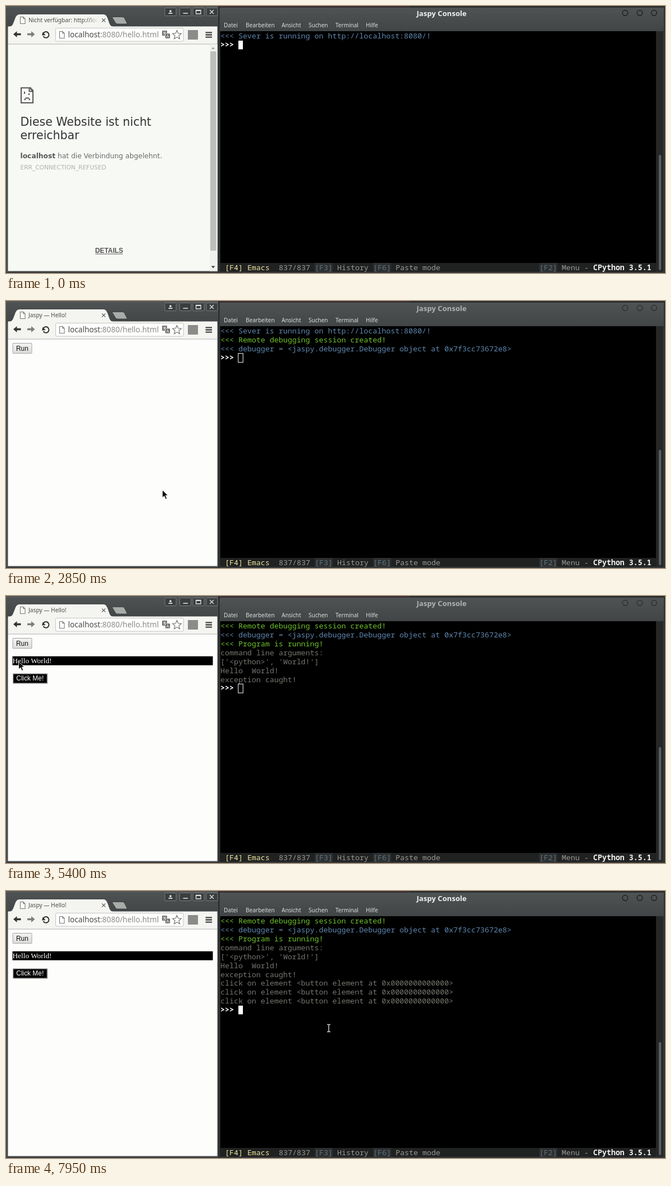
Animation, 1174 px wide and 477 px high, one loop 8 s. Source, as an HTML page:

```html
<!DOCTYPE html>
<html lang="de">
<head>
<meta charset="utf-8">
<title>Jaspy Console</title>
<style>
html, body { margin: 0; width: 100%; height: 100%; overflow: hidden; background: #2b2d2d; }
svg { display: block; width: 1174px; height: 477px; }
text { white-space: pre; }
.ui { font-family: "Noto Sans", sans-serif; }
.web { font-family: "DejaVu Sans", sans-serif; }
.btn { font-family: "Liberation Sans", Arial, sans-serif; font-size: 11.9px; }
.mono { font-family: "Noto Sans Mono", monospace; font-size: 13.3px; }
.b { font-weight: bold; }
</style>
</head>
<body>
<svg viewBox="0 0 1174 477" xmlns="http://www.w3.org/2000/svg">
  <defs>
    <linearGradient id="bar" x1="0" y1="0" x2="0" y2="1">
      <stop offset="0" stop-color="#505354"/><stop offset="1" stop-color="#424546"/>
    </linearGradient>
    <linearGradient id="face" x1="0" y1="0" x2="0" y2="1">
      <stop offset="0" stop-color="#f3f3f2"/><stop offset="1" stop-color="#dcdddb"/>
    </linearGradient>
    <linearGradient id="fade" gradientUnits="userSpaceOnUse" x1="146" x2="164" y1="0" y2="0">
      <stop offset="0" stop-color="#4a4a4a"/><stop offset="1" stop-color="#4a4a4a" stop-opacity="0"/>
    </linearGradient>
    <path id="doc" d="M.5 .5H5.8L9 3.7V12.5H.5ZM5.8 .5V3.7H9" fill="#fff" stroke="#777" stroke-width="1.1"/>
  </defs>

  <rect width="1174" height="477" fill="#2b2d2d"/>
  <path d="M380 .8H720" stroke="#4a3335" stroke-width="1.6"/>

  <!-- browser window -->
  <rect y="1" width="378" height="475" fill="#4a4d4d"/>
  <rect x="1" y="1" width="376" height="38" fill="url(#bar)"/>
  <path d="M0 1H378" stroke="#6a6d6d"/>
  <g id="winBtns" stroke="#777a7a" fill="#3b3e3e"></g>
  <g fill="none" stroke="#e2e3e2" stroke-width="1.3">
    <path d="M315.5 13H324M338.5 7.5H347V14H338.5ZM338.5 8.3H347M363 7L370 14M370 7L363 14"/>
    <path d="M289.5 13H296.5" stroke-width="1.8"/><circle cx="293" cy="9.2" r="1.2" fill="#e2e3e2"/>
  </g>
  <path d="M189 20Q188 19.5 191 19.5H207Q210 19.5 211 21.5L215.5 30.5Q216 32 214 32H199Q196 32 195 30Z" fill="#a9aba8" stroke="#333636" stroke-width=".8"/>
  <path d="M5 37C12 36.500 12 33 16 23Q18.500 15 24 15H174Q178.500 15 181 22C185 33 185 36.500 192 37Z" fill="#f4f5f1"/>
  <rect x="3.500" y="36.500" width="373" height="32" fill="#f4f5f1"/>
  <path d="M3.500 68H376.500" stroke="#b6b7b4"/>
  <use id="tabDoc" href="#doc" x="25" y="19"/>
  <path id="spin" d="M28 20.800A6 6 0 0 1 32 20.500" fill="none" stroke="#5b8bd8" stroke-width="1.6"/>
  <text id="tab" class="ui" x="40" y="29.300" font-size="10.2" fill="#4a4a4a"></text>
  <path d="M171 22.500L177 28.500M177 22.500L171 28.500" stroke="#6a6a6a" stroke-width="1.3"/>

  <path d="M13 50.500L19.500 45V48.700H26.500V52.300H19.500V56Z" fill="#333"/>
  <path d="M51.500 50.500L45 45V48.700H38V52.300H45V56Z" fill="#7d7e7c"/>
  <g id="reload">
    <path d="M66.500 54A5.300 5.300 0 1 0 66.300 49.200" fill="none" stroke="#333" stroke-width="2"/>
    <path d="M64 52.500L70.500 52L65.500 46.500Z" fill="#333"/>
  </g>
  <g id="stop" fill="none" stroke="#c5352c" stroke-width="2.600">
    <circle cx="71" cy="51" r="5.600"/><path d="M67 47.500L75 54.500"/>
  </g>
  <rect x="88.500" y="39.500" width="227.500" height="23.500" rx="2" fill="#fefefd" stroke="#c4c5c2"/>
  <use href="#doc" x="95" y="45"/>
  <text class="ui" x="110.500" y="56.300" font-size="13.600" fill="#8c8c8a"><tspan fill="#4b4b4b">localhost</tspan>:8080/hello.html</text>
  <g id="translate">
    <rect x="278" y="44" width="9" height="9" rx="1" fill="#777"/>
    <rect x="283.500" y="49" width="9" height="9" rx="1" fill="#666" stroke="#fefefd" stroke-width=".7"/>
    <path d="M280 47H285M282.500 46V47C282.500 49 281 50.500 280 51M281 48.500L285 51M285.500 56.500L288 51L290.500 56.500M286.500 54.800H289.500" fill="none" stroke="#eee" stroke-width=".9"/>
  </g>
  <path d="M304.500 43.500L306.700 48.800L312.300 49.300L308 53L309.400 58.600L304.500 55.600L299.600 58.600L301 53L296.700 49.300L302.300 48.800Z" fill="#fefefd" stroke="#777" stroke-width="1.200"/>
  <rect x="324" y="43" width="18" height="17" fill="#8b8b89"/>
  <path d="M355.500 47.300H367M355.500 51.500H367M355.500 55.700H367" stroke="#444" stroke-width="2.300"/>

  <g id="errPage">
    <rect x="3.500" y="68.500" width="373" height="405" fill="#f7f9f5"/>
    <rect x="363" y="68.500" width="13.500" height="405" fill="#f1f2ef"/>
    <rect x="364" y="81" width="10.500" height="356" fill="#bebfbc"/>
    <path d="M366 77L369 73.500L372 77Z" fill="#a2a3a0"/>
    <path d="M365.500 464.500H372.500L369 468.500Z" fill="#444"/>
    <path d="M41.500 146.200H27V173H48V152.500H41.500V146.200H44V148.500H46V150.500H48V152.500" fill="none" stroke="#565756" stroke-width="2"/>
    <path d="M32 153H34V157H32ZM40 156H42V159H40ZM34.500 163.500H41V165.500H34.500ZM32.500 165.500H35V168H32.500ZM40.500 165.500H43V168H40.500Z" fill="#565756"/>
    <g class="web">
      <g font-size="20.450" fill="#333"><text x="25.500" y="213.500">Diese Website ist nicht</text><text x="25.500" y="238.200">erreichbar</text></g>
      <text x="25.500" y="272" font-size="12.250" fill="#6a6b6a"><tspan class="b" fill="#565756">localhost</tspan> hat die Verbindung abgelehnt.</text>
      <text x="25.500" y="292.300" font-size="10.600" fill="#b0b2af">ERR_CONNECTION_REFUSED</text>
    </g>
    <text class="btn b" x="158.700" y="441.200" fill="#565756">DETAILS</text>
    <path d="M159 443H208" stroke="#565756"/>
  </g>

  <g id="helloPage">
    <rect x="3.500" y="68.500" width="373" height="405" fill="#fdfefc"/>
    <rect id="run" x="12" y="75.500" width="34" height="18" rx="1" stroke="#a5a6a4"/>
    <text class="btn" x="18" y="88.500" fill="#111">Run</text>
    <g id="hello">
      <rect x="11.500" y="107.700" width="357" height="16" fill="#000"/>
      <text x="11.500" y="120" font-family="'Liberation Serif', serif" font-size="13.300" fill="#fff">Hello World!</text>
    </g>
    <g id="click">
      <rect id="ring" x="11.500" y="137.500" width="62.500" height="19" fill="none" stroke="#8a8a8a"/>
      <rect id="face2" x="13" y="139" width="60" height="16.500"/>
      <path d="M73.200 138.500V155.700H12" fill="none" stroke="#747474" stroke-width="1.600"/>
      <path d="M12.500 156V138.700H73.500" fill="none" stroke="#bbb" stroke-width="1.400"/>
      <text id="clickText" class="btn" x="18.300" y="151">Click Me!</text>
    </g>
  </g>

  <!-- terminal window -->
  <rect x="378" y="1" width="2" height="475" fill="#2a2c2c"/>
  <rect x="380" y="2.500" width="792" height="474" fill="#3b3e3e"/>
  <rect x="381" y="3" width="791" height="42" fill="url(#bar)"/>
  <text id="title" class="ui b" x="776" y="18" font-size="13.100" text-anchor="middle" textLength="">Jaspy Console</text>
  <g id="dots" fill="none" stroke-width="1.400"></g>
  <g id="menu" class="ui" font-size="10" fill="#dcdddc"></g>
  <rect x="381.500" y="45" width="776.500" height="430" fill="#000"/>
  <rect x="1158" y="45" width="13" height="430" fill="#262828"/>
  <rect id="thumb" x="1163" width="4.200" rx="2" fill="#5c5f5f"/>
  <rect x="381.500" y="459" width="776.500" height="16" fill="#202121"/>
  <g id="status" class="mono"></g>
  <g id="lines" class="mono"></g>
  <rect id="caret"/>

  <path id="arrow" d="M.5 .5V14.500L3.800 11.500L6.400 17L8.800 16L6.400 10.500H10.700Z" fill="#111" stroke="#fff" stroke-width=".9"/>
  <path id="beam" d="M-3 -6.500H-1L0 -5.500L1 -6.500H3M0 -5.500V5.500M-3 6.500H-1L0 5.500L1 6.500H3" fill="none" stroke="#ccc" stroke-width="1.500"/>
</svg>
<script>
const NS = 'http://www.w3.org/2000/svg';
const $ = id => document.getElementById(id);
const LOOP = 8000, TICK = 150, ROW = 15.88, BASE = 58.3;
const BLUE = '#5f87af', GREEN = '#6fc22c', GREY = '#77756f';

function add(parent, tag, attrs, text = '') {
  const el = document.createElementNS(NS, tag);
  for (const k in attrs) el.setAttribute(k, attrs[k]);
  el.textContent = text;
  return $(parent).appendChild(el);
}
const set = (id, attrs) => { for (const k in attrs) $(id).setAttribute(k, attrs[k]); };
const show = (id, on) => set(id, { visibility: on ? 'inherit' : 'hidden' });

$('title').removeAttribute('textLength');
for (const x of [283, 309.5, 333, 357]) add('winBtns', 'rect', { x, y: 3.5, width: 20, height: 14, rx: 1 });
for (const cx of [1103, 1129, 1154.5]) add('dots', 'circle', { cx, cy: 12.3, r: 4.8 });
[['Datei', 388], ['Bearbeiten', 427], ['Ansicht', 491], ['Suchen', 539], ['Terminal', 587], ['Hilfe', 641]]
  .forEach(([s, x]) => add('menu', 'text', { x, y: 38 }, s));
[[1, '[F4] Emacs', '#eee8a0'], [13, '837/837', '#989994'], [21, '[F3]', '#5d737d'], [26, 'History', '#989994'],
  [34, '[F6]', '#5d737d'], [39, 'Paste mode', '#989994'], [71, '[F2]', '#5d737d'], [76, 'Menu -', '#989994'],
  [83, 'CPython 3.5.1', '#f0f0ee', 'b']].forEach(([col, s, fill, cls = '']) => {
  if (s.length === 4) add('status', 'rect', { x: 382 + col * 8, y: 459, width: 32, height: 16, fill: '#2d2f30' });
  add('status', 'text', { x: 382 + col * 8, y: 472, fill, class: cls }, s);
});

// time printed, text, colour
const clickLine = 'click on element <button element at 0x0000000000000>';
const log = [
  [0, '<<< Sever is running on http://localhost:8080/!', BLUE],
  [2700, '<<< Remote debugging session created!', GREEN],
  [2850, '<<< debugger = <jaspy.debugger.Debugger object at 0x7f3cc73672e8>', BLUE],
  [4200, '<<< Program is running!', GREEN],
  [4350, 'command line arguments:', GREY],
  [4350, "['<python>', 'World!']", GREY],
  [4350, 'Hello  World!', GREY],
  [4500, 'exception caught!', GREY],
  [5850, clickLine, GREY], [6600, clickLine, GREY], [7050, clickLine, GREY]
].map(([at, s, fill]) => ({ at, el: add('lines', 'text', { x: 382, fill }, s) }));
const prompt = add('lines', 'text', { x: 382, fill: '#fff', class: 'b' }, '>>>');

// pointer legs: start, end, from, to
const legs = [
  [600, 1350, [902, 376], [287, 336]],
  [1650, 1650, [278, 337], [278, 337]],
  [3000, 3750, [278, 337], [30, 81]],
  [3900, 3900, [15, 84], [15, 84]],
  [5250, 5550, [15, 84], [29, 149]],
  [7200, 7800, [29, 149], [575, 245]]
];
function pointer(t) {
  const leg = legs.filter(l => l[0] <= t).pop();
  if (!leg) return null;
  const [a, b, p, q] = leg;
  const u = b > a ? Math.min(1, (t - a) / (b - a)) : 1;
  const e = u * u * (3 - 2 * u);
  return p.map((v, i) => v + (q[i] - v) * e);
}

// value flips at each listed time
const flips = (t, times) => times.filter(x => x <= t).length % 2 === 1;

function draw(ms) {
  const t = Math.floor(ms / TICK) * TICK;
  const loading = t === 2550, loaded = t >= 2700;
  const focused = t < 1950 || t >= 7650;

  set('tab', { fill: t < 2550 ? 'url(#fade)' : '#4a4a4a' });
  $('tab').textContent = loaded ? 'Jaspy — Hello!' : loading ? 'localhost:8080/hello.html' : 'Nicht verfügbar: http://loc';
  show('tabDoc', !loading);
  show('spin', loading);
  show('stop', loading);
  show('reload', !loading);
  show('translate', !loading);
  show('errPage', !loaded);
  show('helloPage', loaded);
  show('hello', t >= 4350);
  show('click', t >= 4500);
  show('ring', t >= 5850 && t < 7650);
  set('run', { fill: t === 4200 ? '#d2d3d1' : 'url(#face)' });
  const dark = flips(t, [4800, 5100, 5400, 5850, 6300, 6600, 7050, 7350, 7800]);
  set('face2', { fill: dark ? '#000' : '#fdfefc' });
  set('clickText', { fill: dark ? '#fff' : '#111' });

  set('title', { fill: focused ? '#f0f1f0' : '#b0b2b1' });
  set('dots', { stroke: focused ? '#1c1e1e' : '#2c2f2f' });
  const top = t >= 4350 ? 1 : 0;
  let row = -top;
  for (const { at, el } of log) {
    const on = at <= t;
    el.setAttribute('visibility', on && row >= 0 ? 'visible' : 'hidden');
    el.setAttribute('y', BASE + row * ROW);
    if (on) row++;
  }
  prompt.setAttribute('y', BASE + row * ROW);
  const lit = !flips(t, [300, 900, 1350, 1650]);
  const y = 46 + row * ROW;
  set('caret', focused
    ? { x: 414, y, width: 8, height: 15.5, fill: '#fff', stroke: 'none' }
    : { x: 413.7, y, width: 8.5, height: 16, fill: 'none', stroke: '#fff' });
  show('caret', lit || !focused);
  set('thumb', top ? { y: 270, height: 202 } : { y: 266, height: 206 });

  const p = pointer(t);
  const inTerm = p && p[0] > 380;
  show('arrow', p && !inTerm);
  show('beam', inTerm);
  if (p) set(inTerm ? 'beam' : 'arrow', { transform: `translate(${p[0]} ${p[1]})` });
}

const start = performance.now();
function loop() {
  draw((performance.now() - start) % LOOP);
  requestAnimationFrame(loop);
}
loop();
</script>
</body>
</html>
```
